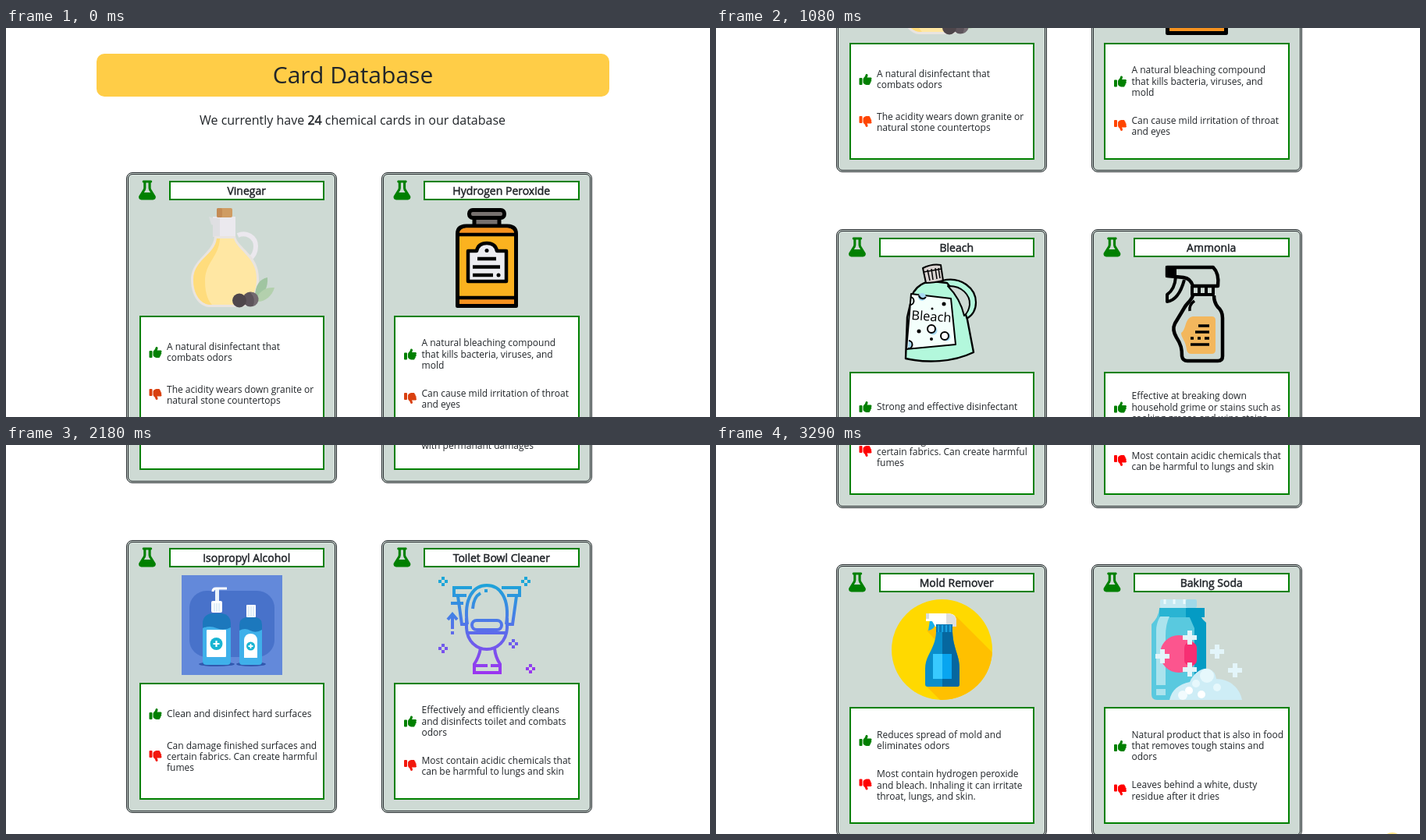
An HTML page that plays this animation: 902 by 499 pixels, repeating every 3.35 s.

```html
<!DOCTYPE html>
<html lang="en">
<head>
<meta charset="utf-8">
<title>Card Database</title>
<style>
html, body { margin: 0; width: 100%; height: 100%; overflow: hidden; background: #fff; }
svg { display: block; width: 902px; height: 499px; font-family: "Open Sans", sans-serif; fill: #212529; }
.head { font-size: 30px; text-anchor: middle; }
.sub { font-size: 16px; }
.name { font-size: 14px; text-anchor: middle; }
.strong { stroke: #212529; stroke-width: .5px; }
.note { font-size: 12px; }
</style>
</head>
<body>
<svg viewBox="0 0 902 499">
  <defs>
    <linearGradient id="cool" gradientUnits="userSpaceOnUse" x1="0" y1="176" x2="0" y2="292">
      <stop offset="0" stop-color="#1ba6d8"/><stop offset=".5" stop-color="#5472ea"/><stop offset="1" stop-color="#9a35f0"/>
    </linearGradient>
    <clipPath id="disc"><circle cx="289.5" cy="262.5" r="64.5"/></clipPath>
    <clipPath id="jar"><path d="M558 198h58v129h-58z"/></clipPath>
    <path id="thumb" transform="scale(.03125)" d="M313 33c26 5 43 30 38 56l-2 12c-5 27-15 52-29 75h144c26 0 48 21 48 48 0 18-10 34-26 43 11 8 18 22 18 37 0 23-17 43-39 47 4 7 7 16 7 25 0 21-14 39-33 46l1 10c0 26-21 48-48 48h-97c-19 0-38-6-54-16l-38-26C176 420 160 390 160 358V247c0-29 13-57 36-75l7-6c27-21 45-51 52-84l2-11c5-26 30-43 56-38zM32 192h64q32 0 32 32v224q0 32-32 32H32q-32 0-32-32V224q0-32 32-32z"/>
    <path id="flask" transform="scale(.0488)" fill="green" fill-rule="evenodd" d="M128 0h192c18 0 32 14 32 32s-14 32-32 32v133c0 12 3 23 9 33l109 176c6 11 10 24 10 37 0 38-31 69-69 69H69c-38 0-69-31-69-69 0-13 4-26 10-37l109-176c6-10 9-21 9-33V64c-18 0-32-14-32-32S110 0 128 0zM192 64v133c0 24-7 47-19 67l-34 56h171l-35-56c-12-20-19-43-19-67V64z"/>
  </defs>
  <g id="page"></g>
  <circle id="glow" r="13" fill="#ffe88a"/>
</svg>
<script>
const LOOP = 3350, TOP = 185.4, PITCH = 422.6;

const plus = (x, y, r, w, c) => `<path d="M${x - r} ${y}h${2 * r}M${x} ${y - r}v${2 * r}" stroke="${c}" stroke-width="${w}"/>`;
const dot = (x, y, r, c) => `<circle cx="${x}" cy="${y}" r="${r}" fill="${c}"/>`;
const box = (x, y, w, h, c, r = 0) => `<rect x="${x}" y="${y}" width="${w}" height="${h}" rx="${r}" fill="${c}"/>`;
const shape = (d, c) => `<path d="${d}" fill="${c}"/>`;
const line = (d, w, c = '#000', fill = 'none') => `<path d="${d}" fill="${fill}" stroke="${c}" stroke-width="${w}" stroke-linejoin="round"/>`;

const vinegar = () =>
  shape('M260 242l8 3v9l-5-2z', '#dedfe1') + box(265, 242, 29, 7, '#e9e7ec') + box(272, 242, 22, 30, '#ebe9ee') + box(265, 244, 9, 24, '#dfdfe2') +
  box(270, 231, 20, 12, '#cf9c63', 2) + box(270, 231, 7, 12, '#c48b55', 2) +
  line('M297 266C308 261 320 268 320 280C320 288 317 292 312 297', 6, '#ebe8ee') +
  shape('M267 267h27C297 283 324 290 324 321C324 342 315 358 299 358H262C246 358 237 341 237 323C237 296 266 289 267 267z', '#e9e4e0') +
  shape('M270 270h22C297 286 321 294 321 321C321 340 313 355 298 355H263C248 355 240 340 240 323C240 297 268 291 270 270z', '#ffe7a3') +
  shape('M270 270h4C273 294 255 300 255 325C255 342 260 351 264 355H263C248 355 240 340 240 323C240 297 268 291 270 270z', '#ffdc7c') +
  shape('M319 345C319 330 325 322 335 320C336 332 331 342 322 348z', '#a0c5a1') +
  shape('M319 350C324 338 332 332 344 333C341 344 331 352 321 351z', '#b3d0ad') +
  dot(313, 348, 9.5, '#5d545b') + dot(299, 349.5, 9, '#4e464b') + shape('M313 339a9 9 0 0 1 3 18q5-9-3-18', '#736a70');

const peroxide = () =>
  shape('M599 245h34v9h-34z', '#77716f') + line('M600 244v9M632 244v9', 5) +
  `<rect x="593.5" y="233.5" width="45" height="10" rx="4.5" fill="#77716f" stroke="#000" stroke-width="5"/>` +
  line('M578.5 264Q578.5 254 590 254h52Q653.5 254 653.5 264v92.5h-75z', 5, '#000', '#fbb21f') +
  shape('M581 263Q582 257 590 256.5h52Q650 257 651 263z', '#f6921e') + box(581, 348, 70, 6, '#f6921e') +
  line('M578 265h76M578 346h76', 4.5) +
  line('M592 286h11Q605 276 616 276Q627 276 629 286h12v39h-49z', 4.5, '#000', '#ececf1') +
  dot(616, 285.5, 2.5, '#000') + line('M604 296h24M598 306.5h35M598 317h26', 4.5) + dot(631, 317, 2.5, '#000');

const bleach = () =>
  line('M290 174C314 168 333 184 333 202C333 213 328 219 321 223', 2.2, '#000', '#b3f8dc') +
  line('M252 191C257 181 267 175 278 175L296 177C309 192 318 207 322 224L330 266C303 279 270 280 243 274L245 221z', 2.4, '#000', '#b3f8dc') +
  line('M297 181C315 180 326 193 325 205Q324 214 318 219C314 202 306 190 297 181z', 2, '#000', '#cedad4') +
  line('M265 158Q277 152 288 154L291 174Q279 177 269 177z', 2, '#000', '#d9d2d0') + line('M266 163l23-4M271 160l3 14M276 159l2 14M281 158l2 14M285 158l2 13', 1.5) +
  line('M250 191L301 197L307 256L244 262z', 2, '#000', '#f4fffc') +
  dot(264, 195, 5, '#a7d9f2') + dot(278, 238, 5.5, '#a7d9f2') + dot(295, 246, 5.5, '#a7d9f2') +
  line('M260 193a5 5 0 0 0 9 2', 2) + line('M247 251a5 5 0 0 1-1 10', 2, '#000', '#a7d9f2') + line('M248 205a5 5 0 0 0 1-10', 2) +
  `<g fill="#fff" stroke="#000" stroke-width="2"><circle cx="276" cy="236" r="5"/><circle cx="293" cy="245" r="5"/></g>` +
  dot(292, 204, 2.5, '#000') + dot(277, 210, 1.5, '#000') + dot(260, 239, 2.5, '#000') + dot(276, 249, 2, '#000') +
  `<text transform="translate(250 224) rotate(4)" font-size="16.5" fill="#000">Bleach</text>`;

const ammonia = () =>
  line('M578 157h59Q645 165 643 181H611Q608 171 599 170L578 168z', 4.5) + box(576, 155, 14, 15, '#000') +
  line('M589 169Q588 185 578 192v9Q593 199 600 173', 4) +
  line('M610 181v11h27v-11M619 181v11M628 181v11', 4) +
  line('M611 193C609 200 603 203 600 209L588 229Q584 237 590 247C596 256 597 262 597 271Q598 277 604 277h39Q649 277 649 271V222Q649 213 643 208Q638 202 638 193', 4.5) +
  line('M613 200Q606 205 607 213', 3.5) +
  shape('M611 220h24q5 0 5 5v38q0 5-5 5h-26q-5 0-6-5C602 251 596 248 596 241C603 237 600 222 611 220z', '#f3b75d') +
  line('M618 232h14M614 240h18M608 248h4M617 248h4M626 248h6M608 256h24', 3.5);

const alcohol = () =>
  box(225, 167, 129, 128, '#6389da') + box(235, 187, 109, 85, '#4872ca', 22) +
  `<ellipse cx="270" cy="281" rx="23" ry="3" fill="#3158ae"/><ellipse cx="314" cy="281" rx="19" ry="3" fill="#3158ae"/>` +
  line('M265 188q0-4 4-4h14', 3, '#fff') + box(268, 185, 5, 17, '#e9f3fb') + box(263, 200, 14, 15, '#fff', 2) + line('M267 203v11M270 203v11M273 203v11', 1, '#bfdcf0') +
  shape('M252 229Q252 218 263 216h14Q288 218 288 229v48q0 5-5 5h-26q-5 0-5-5z', '#1c78bd') +
  shape('M252 235q9-4 18 0t18-1v43q0 5-5 5h-26q-5 0-5-5z', '#3fb0ea') + box(257, 237, 25, 35, '#fff', 1) +
  dot(269.5, 255, 8, '#19b5d2') + plus(269.5, 255, 4, 2.2, '#fff') +
  box(308, 205, 12, 16, '#fff', 1) + line('M311 207v13M314 207v13M317 207v13', 1, '#bfdcf0') +
  shape('M299 231Q299 223 307 221h14Q328 223 328 231v47q0 4-4 4h-21q-4 0-4-4z', '#1c78bd') +
  shape('M299 238q7-4 14 0t15-1v41q0 4-4 4h-21q-4 0-4-4z', '#3fb0ea') + shape('M305 273V250Q306 242 313.5 242Q321 242 322 250v23z', '#fff') +
  dot(313.5, 258, 5.5, '#19b5d2') + plus(313.5, 258, 3, 1.8, '#fff');

const sparkle = (x, y) => `<path d="M${x - 6} ${y}h4M${x + 2} ${y}h4M${x} ${y - 6}v4M${x} ${y + 2}v4"/>`;
const toilet = () => `<g fill="none" stroke="url(#cool)" stroke-width="4">` +
  '<path d="M590 193H574V183h23M635 183h23v10H642M579 194l5 36h6M654 194l-5 36h-6M570 203h16"/>' +
  '<path d="M591 230C586 195 600 180 616 180C632 180 646 195 641 230M598 210Q599 195 608 190M613 187h4"/>' +
  '<path d="M590 222V235C591 252 603 262 616 262C629 262 641 252 642 235V222M590 241h52"/>' +
  '<rect x="597" y="225" width="38" height="12" rx="6"/>' +
  '<path d="M608 261Q606 272 600 281v11h33v-11Q627 272 626 261M602 283h15M621 283h11"/>' +
  '<path d="M572 236V217M566 224l6-7 6 7M572 239v4"/>' +
  [[560, 175], [666, 175], [650, 255], [560, 261], [672, 287]].map(p => sparkle(...p)).join('') + '</g>';

const mold = () => dot(289.5, 262.5, 64.5, '#ffd900') +
  `<g clip-path="url(#disc)">${shape('M308 220L370 282V340H300L268 308L290 260L270 238z', '#ffc000')}</g>` +
  shape('M274 225l7 3Q281 236 272 238z', '#1aaee8') +
  shape('M269 216h28Q308 216 308 226v7h-27l-4-7h-8z', '#fff') + shape('M295 216Q308 216 308 226v7h-13z', '#dedede') +
  box(269, 216, 4, 7, '#d7dde0') + box(282, 230, 21, 11, '#0a78b6') + line('M285 231v9M290 231v9M295 231v9M300 231v9', 2, '#19a3e2') +
  shape('M282 240C281 262 268 269 268 287v20q0 3 3 3h38q3 0 3-3V287C312 269 304 262 303 240z', '#0a8ecb') +
  shape('M290 240h13C304 262 312 269 312 287v20q0 3-3 3H290z', '#06679f') + box(278, 268, 12, 32, '#38caff') + box(290, 268, 12, 32, '#08a5f0');

const soda = () =>
  shape('M568 210h50Q619 221 628 228V320q0 7-7 7h-56q-7 0-7-7V230Q567 221 568 210z', '#59c9df') +
  shape('M602 210h16Q619 221 628 228V320q0 7-7 7h-8V235z', '#049bc4') + box(568, 209, 50, 12, '#29b4d3') + box(602, 209, 24, 12, '#049bc4') +
  box(569, 198, 47, 11, '#c5e9f2', 2) + line('M575 198v6M587 198v6M600 198v6', 3, '#edfafd') + box(602, 198, 14, 11, '#a0d9e9', 2) +
  shape('M569 220h12Q576 230 576 245V308h-12V238Q564 229 569 220z', '#abe3ed') + box(564, 313, 12, 8, '#abe3ed') +
  `<g clip-path="url(#jar)">${dot(593, 268, 24, '#fc558e') + box(600, 253, 16, 30, '#f72e73', 7)}</g>` +
  shape('M581 327C584 314 593 307 607 304C612 292 623 285 631 287Q640 290 641 300C660 300 672 314 674 327z', '#ceedf6') +
  dot(629, 296, 9, '#e6f8fc') + dot(606, 315, 5, '#fff') + dot(622, 320, 5, '#fff') + dot(598, 321, 6, '#f2fbfe') + dot(615, 306, 5, '#e6f8fc') + dot(642, 311, 5, '#e6f8fc') +
  [[572, 271], [607, 247], [607, 288], [642, 265], [665, 289]].map(p => plus(...p, 9, 6, '#e3f5fa')).join('');

// Rows: art offset, then two cards of [name, art, good centre, good lines, bad centre, bad lines].
const rows = [
  [0,
    ['Vinegar', vinegar, 416, 'A natural disinfectant that|combats odors', 471, 'The acidity wears down granite or|natural stone countertops'],
    ['Hydrogen Peroxide', peroxide, 418.5, 'A natural bleaching compound|that kills bacteria, viruses, and|mold', 476, 'Can cause mild irritation of throat|and eyes']],
  [500,
    ['Bleach', bleach, 336, 'Strong and effective disinfectant', 389, 'Reacts with ammonia and acids|that create toxic fumes'],
    ['Ammonia', ammonia, 336.5, 'Effective at breaking down|household grime or stains such as|cooking grease and wine stains.', 396, 'High concentration can cause|corrosive injuries to eyes and skin|with permanant damages']],
  [909,
    ['Isopropyl Alcohol', alcohol, 345, 'Clean and disinfect hard surfaces', 400, 'Can damage finished surfaces and|certain fabrics. Can create harmful|fumes'],
    ['Toilet Bowl Cleaner', toilet, 354.5, 'Effectively and efficiently cleans|and disinfects toilet and combats|odors', 412, 'Most contain acidic chemicals that|can be harmful to lungs and skin']],
  [1300,
    ['Mold Remover', mold, 379, 'Reduces spread of mold and|eliminates odors', 436.5, 'Most contain hydrogen peroxide|and bleach. Inhaling it can irritate|throat, lungs, and skin.'],
    ['Baking Soda', soda, 386, 'Natural product that is also in food|that removes tough stains and|odors', 443.5, 'Leaves behind a white, dusty|residue after it dries']]
];

const px = Math.round;
const frame = (x, y, w, h) => `<rect x="${px(x) + 1}" y="${px(y) + 1}" width="${w - 2}" height="${h - 2}" fill="#fff" stroke="green" stroke-width="2"/>`;

function note(x, y, text, good) {
  const lines = text.split('|');
  const top = y + 4 - (lines.length - 1) * 7.2;
  const icon = good
    ? `<use href="#thumb" x="${x + 29.25}" y="${y - 8}" fill="green"/>`
    : `<use href="#thumb" transform="translate(${x + 29.25} ${y + 7}) scale(1 -1)" fill="currentColor"/>`;
  return icon + lines.map((s, i) => `<text class="note" x="${x + 51.75}" y="${px(top + i * 14.4)}">${s}</text>`).join('');
}

function card(x, y, shift, [name, art, goodY, good, badY, bad]) {
  const X = px(x), Y = px(y), nameY = px(y + 10.6);
  const edge = (d, fill) => `<rect x="${X + d}" y="${Y + d}" width="${270 - 2 * d}" height="${350 - 2 * d}" rx="${8 - d}" fill="${fill}" stroke="#212529"/>`;
  return edge(.5, '#cedad4') + edge(2.5, 'none') +
    `<use href="#flask" x="${x + 15.75}" y="${nameY - .5}"/>` +
    frame(x + 54.5, nameY, px(x + 254) - px(x + 54.5), 25) +
    `<text class="name strong" x="${x + 154}" y="${nameY + 18}">${name}</text>` +
    `<g transform="translate(0 ${shift})">${art()}</g>` +
    frame(x + 16.5, y + 183.2, px(x + 254) - px(x + 16.5), 150) +
    note(x, goodY + shift, good, true) + note(x, badY + shift, bad, false);
}

const page = document.getElementById('page'), glow = document.getElementById('glow');
page.innerHTML = box(116, 33, 657, 55, '#ffcd47', 10) +
  '<text class="head" x="444.5" y="71">Card Database</text>' +
  '<text class="sub" x="248" y="124">We currently have <tspan class="strong">24</tspan> chemical cards in our database</text>' +
  rows.map(([shift, left, right], i) => {
    const y = TOP + i * PITCH;
    return card(154.25, y, shift, left) + card(480.75, y, shift, right);
  }).join('');

// Held steps of the wheel scroll: [ms, scroll top, warning colour].
const steps = [
  [0, 0, '#d9400f'], [540, 12, '#ff4500'], [610, 75], [680, 155], [750, 198], [810, 200],
  [940, 215], [1010, 275], [1080, 350], [1150, 420], [1220, 480], [1290, 500, '#ee2c14'],
  [1430, 535], [1500, 610], [1560, 675], [1630, 700, '#ad0505'],
  [1830, 735], [1900, 810], [1970, 875], [2040, 900, '#f2180c'],
  [2180, 909], [2250, 960], [2310, 1035], [2380, 1085], [2450, 1100, '#ff5a08'],
  [2580, 1112], [2650, 1175], [2720, 1250], [2790, 1295], [2850, 1300, '#ff0000']
];

function draw(t) {
  let top = 0, tint;
  for (const [at, y, c] of steps) {
    if (at > t) break;
    top = y;
    tint = c || tint;
  }
  page.setAttribute('transform', `translate(0 ${-top})`);
  page.setAttribute('color', tint);
  const [gx, gy] = t >= 3290 ? [866.5, 510] : t >= 2930 && t < 3000 ? [911, 478] : [-50, -50];
  glow.setAttribute('cx', gx);
  glow.setAttribute('cy', gy);
}

const start = performance.now();
function tick() {
  draw((performance.now() - start) % LOOP);
  requestAnimationFrame(tick);
}
draw(0);
tick();
</script>
</body>
</html>
```
